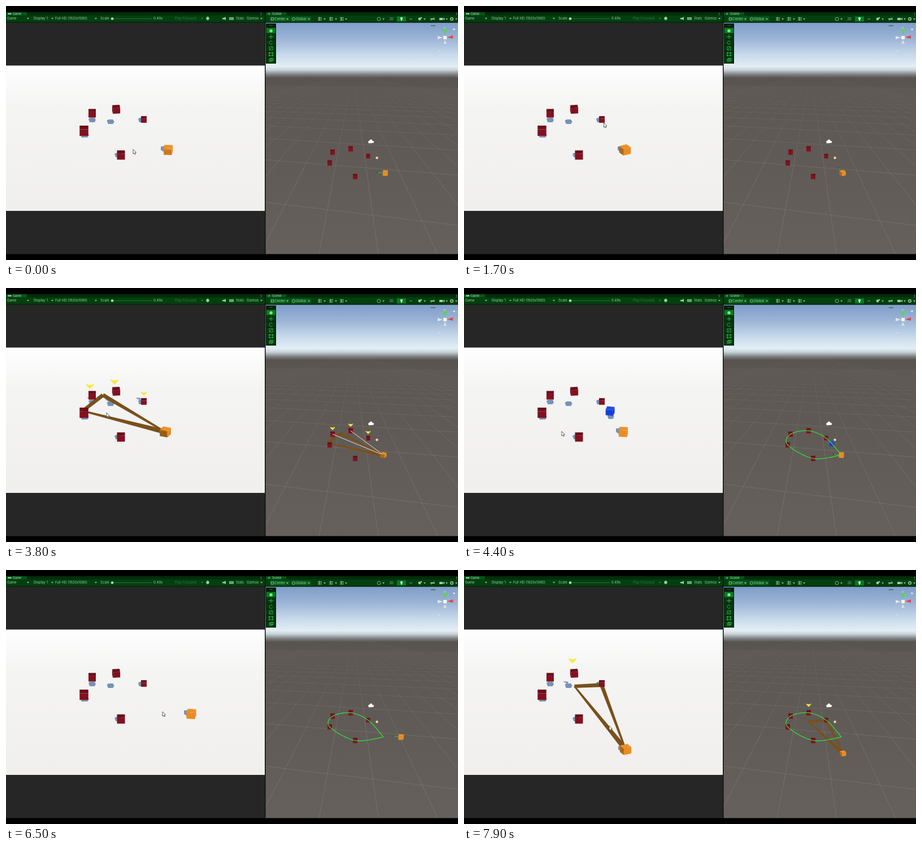
An HTML page with a canvas for the animation above (8000 ms loop, 800 px wide and 450 px high).

```html
<!DOCTYPE html>
<html lang="en">
<head>
<meta charset="utf-8">
<title>Boomerang targeting</title>
<style>
html, body { margin: 0; width: 100%; height: 100%; overflow: hidden; background: #000; }
canvas { display: block; width: 800px; height: 450px; }
</style>
</head>
<body>
<canvas id="stage" width="800" height="450"></canvas>
<script>
const ctx = document.getElementById('stage').getContext('2d');
const LOOP = 8000, STEP = 100, TAU = Math.PI * 2;

// Target order is the order in which the thrown cube visits them.
const targets = [
  { x: 244, y: 201, s: 10, sx: 641, sy: 266, shadow: [239, 202], tip: [0, -16] },
  { x: 195, y: 183, s: 13, sx: 610, sy: 253, shadow: [185, 205], tip: [-3, -19] },
  { x: 152.5, y: 190, s: 13, sx: 578, sy: 259, shadow: [152.5, 202], tip: [-4, -18] },
  { x: 138, y: 221, s: 15.5, sx: 573, sy: 278, shadow: [139, 229], tip: [-5, -17.5] },
  { x: 203.5, y: 264, s: 14, sx: 618, sy: 302, shadow: [199, 264], tip: [-2, -18] }
];

const cursorKeys = [[0, 225, 254], [350, 205, 238], [800, 243, 223], [1400, 255, 208],
  [2000, 240, 206], [2700, 265, 220], [2900, 265, 220], [3300, 225, 206], [3800, 178, 221],
  [4200, 172, 252], [5200, 181, 271], [5800, 181, 271], [6500, 277, 251],
  [7100, 264, 284], [7900, 257, 276]];
const playerKeys = [[0, 287, 255], [200, 285, 255], [1800, 285, 255], [2600, 321, 255],
  [2900, 321, 255], [3400, 282, 255], [5800, 282, 255], [6400, 328, 255],
  [6600, 328, 255], [7400, 286, 318], [7900, 286, 318]];
const flightKeys = [[4200, 0], [5200, 3.36], [5400, 4], [5600, 4.85], [5900, 6]];
const aimSpans = [[200, 1700, 128], [3200, 4200, 152], [7600, 8000, 154]];
// Target index, first and last time it carries an arrow.
const marks = [[3, 400, 1700], [1, 700, 1700], [0, 3350, 4200], [1, 3500, 4200],
  [2, 3650, 4200], [3, 3950, 4200], [1, 7700, 8000]];

function at(keys, t, ease = true) {
  let i = 0;
  while (i < keys.length - 2 && t >= keys[i + 1][0]) i++;
  const a = keys[i], b = keys[i + 1];
  let p = Math.max(0, Math.min(1, (t - a[0]) / (b[0] - a[0])));
  if (ease) p = p * p * (3 - 2 * p);
  return a.slice(1).map((v, k) => v + (b[k + 1] - v) * p);
}

const toScene = ([x, y]) => {
  const d = y - 255;
  return [668 + (x - 282) * 0.68, 296 + d * 0.524 - d * d * 0.00101];
};

function spline(pts, u) {
  const i = Math.max(0, Math.min(pts.length - 2, Math.floor(u))), p = u - i;
  const get = k => pts[Math.max(0, Math.min(pts.length - 1, k))];
  const [a, b, c, d] = [get(i - 1), get(i), get(i + 1), get(i + 2)];
  return [0, 1].map(k => 0.5 * (2 * b[k] + (c[k] - a[k]) * p +
    (2 * a[k] - 5 * b[k] + 4 * c[k] - d[k]) * p * p + (3 * b[k] - a[k] - 3 * c[k] + d[k]) * p ** 3));
}

function rect(x, y, w, h, fill) { ctx.fillStyle = fill; ctx.fillRect(x, y, w, h); }
function poly(pts, fill) {
  ctx.beginPath();
  pts.forEach(p => ctx.lineTo(p[0], p[1]));
  ctx.closePath();
  ctx.fillStyle = fill;
  ctx.fill();
}
function line(a, b, color, width = 1) {
  ctx.beginPath();
  ctx.moveTo(a[0], a[1]);
  ctx.lineTo(b[0], b[1]);
  ctx.strokeStyle = color;
  ctx.lineWidth = width;
  ctx.stroke();
}
function dot(x, y, r, fill) {
  ctx.beginPath();
  ctx.arc(x, y, r, 0, TAU);
  ctx.fillStyle = fill;
  ctx.fill();
}
function text(s, x, y, color = '#9bd0a0', size = 6) {
  ctx.font = size + 'px Inter, sans-serif';
  ctx.fillStyle = color;
  ctx.fillText(s, x, y);
}
function gradient(y0, y1, stops) {
  const g = ctx.createLinearGradient(0, y0, 0, y1);
  stops.forEach(([p, c]) => g.addColorStop(p, c));
  return g;
}
const mix = (a, b, p) => [a[0] + (b[0] - a[0]) * p, a[1] + (b[1] - a[1]) * p];

function cube([x, y], size, angle, [top, light, dark], stripes) {
  const h = size * 0.75, ring = [0, 1, 2, 3].map(i => {
    const a = angle + TAU / 8 + i * TAU / 4;
    return [x + Math.cos(a) * size * 0.707, y - h / 2 + Math.sin(a) * size * 0.3];
  });
  ring.forEach((p, i) => {
    const q = ring[(i + 1) % 4], n = angle + (i + 1) * TAU / 4;
    if (Math.sin(n) < 0.02) return;
    const down = v => [v[0], v[1] + h];
    poly([p, q, down(q), down(p)], Math.cos(n) < -0.3 ? dark : light);
    if (stripes && Math.cos(n) < 0.3) {
      for (let k = 1; k < 6; k++) {
        const m = mix(p, q, k / 6);
        line([m[0], m[1] + 2], down(m), 'rgba(70,45,15,.6)', 0.8);
      }
    }
  });
  poly(ring, top);
}
const RED = ['#6d0e1a', '#84101f', '#650b16'];
const ORANGE = ['#ec9129', '#ea8c23', '#a9681c'];
const BLUE = ['#1c4ee0', '#153fd6', '#1137b8'];

function shadow(x, y, w) {
  poly([[x - w / 2, y - 2], [x - w / 4, y - 4], [x + w / 3, y - 4], [x + w / 2, y],
    [x + w / 3, y + 4], [x - w / 3, y + 4]], '#7891b7');
}

function arrow(x, y, k) {
  poly([[-8, -4], [-4, -3], [-2, -2], [0, -3], [2, -2], [4, -3], [8, -4], [4, 1], [0, 5], [-4, 1]]
    .map(p => [x + p[0] * k, y + p[1] * k]), '#f7e943');
}

function taper(a, b, wa, wb) {
  const d = Math.hypot(b[0] - a[0], b[1] - a[1]) || 1;
  const nx = (a[1] - b[1]) / d / 2, ny = (b[0] - a[0]) / d / 2;
  poly([[a[0] + nx * wa, a[1] + ny * wa], [b[0] + nx * wb, b[1] + ny * wb],
    [b[0] - nx * wb, b[1] - ny * wb], [a[0] - nx * wa, a[1] - ny * wa]], '#79501a');
}
function cone([apex, a, b], k) {
  taper(a, apex, 3 * k, 9 * k);
  taper(b, apex, 7 * k, 3 * k);
  taper(a, b, 6 * k, 7 * k);
}

function state(t) {
  const player = at(playerKeys, t), cursor = at(cursorKeys, t);
  const SQUASH = 0.9;
  const aim = Math.atan2((cursor[1] - player[1]) / SQUASH, cursor[0] - player[0]) + 0.08;
  const span = aimSpans.find(s => t >= s[0] && t < s[1]);
  const reach = (a, r) => [player[0] + Math.cos(a) * r, player[1] + Math.sin(a) * r * SQUASH];
  const wedge = span && [player, reach(aim - 0.153, span[2]), reach(aim + 0.153, span[2] * 0.87)];
  return { t, player, cursor, aim, wedge, reach,
    bob: 5 * Math.cos(TAU * (t / 1600 - 0.56)),
    flight: t >= 4200 && t < 5900 ? at(flightKeys, t, false)[0] : null,
    marked: marks.filter(m => t >= m[1] && t < m[2]).map(m => targets[m[0]]) };
}

const gamePath = [[282, 255], ...targets.map(o => [o.x, o.y]), [282, 255]];
const scenePath = [[668, 296], ...targets.map(o => [o.sx, o.sy]), [668, 296]];

function drawGame(s) {
  rect(0, 29, 458, 411, '#262626');
  rect(0, 105.5, 458, 257.5, gradient(105, 363, [[0, '#fdfefd'], [0.3, '#f4f4f3'], [1, '#f0efee']]));
  targets.forEach(o => shadow(...o.shadow, o.s));
  s.marked.forEach(o => {
    const x = o.shadow[0] - 5, y = o.shadow[1] - 5;
    poly([[x - 5, y - 3], [x + 5, y - 2], [x + 3, y + 2]], '#7891b7');
  });
  const [px, py] = s.player;
  poly([[px - 13, py - 6], [px - 5, py - 7], [px + 2, py + 7], [px - 6, py + 5], [px - 13, py]], '#7891b7');
  const blue = s.flight !== null && spline(gamePath, s.flight);
  if (blue) {
    shadow(blue[0] + 1, blue[1] + 10, 12);
    cube(blue, 13.5, 0.2, BLUE);
  }
  if (s.wedge) cone(s.wedge, 1);
  targets.forEach((o, i) => cube([o.x, o.y], o.s, i === 1 ? -0.1 : 0, RED));
  cube(s.player, 15, s.aim, ORANGE, s.t < 200 || s.t >= 1800 && s.t < 4200);
  s.marked.forEach(o => arrow(o.x + o.tip[0], o.y + o.tip[1] + s.bob, o.s > 10 ? 1 : 0.8));
  drawCursor(...s.cursor);
}

function drawCursor(x, y) {
  const shape = [[0, 0], [0, 8], [1.8, 6.5], [3, 9], [4.3, 8.4], [3.2, 5.8], [5.5, 5.6]];
  poly(shape.map(p => [x + p[0], y + p[1]]), '#fff');
  ctx.strokeStyle = '#222';
  ctx.lineWidth = 0.7;
  ctx.stroke();
}

function drawGround() {
  rect(459, 29, 341, 411, gradient(29, 440, [[0, '#7f9dc8'], [0.07, '#9bb4d6'], [0.14, '#c8d9eb'],
    [0.19, '#e3eff5'], [0.205, '#c9d3d8'], [0.225, '#7d8082'], [0.24, '#57534f'],
    [0.3, '#5d5753'], [1, '#65605b']]));
  const faded = gradient(125, 300, [[0, 'rgba(150,145,140,.05)'], [1, 'rgba(155,150,145,.42)']]);
  for (let i = -12; i <= 12; i++) {
    line([614 + (i * 105 + 45) * 0.025, 126], [659 + i * 105, 440], faded, 0.7);
  }
  for (let n = 0; n < 22; n++) {
    const d = 970 / (4 + 2 * n);
    line([459, 122 + d * 0.93], [800, 122 + d * 1.1], faded, 0.7);
  }
}

function drawScene(s) {
  ctx.save();
  ctx.beginPath();
  ctx.rect(459, 29, 341, 411);
  ctx.clip();
  drawGround();
  const player = toScene(s.player);
  if (s.wedge) cone(s.wedge.map(toScene), 0.65);
  const blue = s.flight !== null && spline(scenePath, s.flight);
  if (blue) cube(blue, 8, 0.1, BLUE);
  targets.forEach(o => cube([o.sx, o.sy], o.s > 10 ? 8 : 7, 0, RED));
  if (!s.wedge) {
    const end = toScene(s.reach(s.aim, 21));
    line(player, end, '#35c83f', 1);
    dot(end[0], end[1], 1, '#164d1b');
  }
  if (s.t >= 4200) {
    ctx.beginPath();
    for (let u = 0; u <= 6.001; u += 0.05) ctx.lineTo(...spline(scenePath, u));
    ctx.strokeStyle = '#2fe53c';
    ctx.lineWidth = 1.2;
    ctx.stroke();
  }
  if (s.t > 3400 && s.t < 4200) {
    s.marked.filter(o => o === targets[1] || o === targets[2])
      .forEach(o => line([o.sx, o.sy], player, '#f2f2ef', 0.9));
  }
  cube(player, 8.5, s.aim, ORANGE);
  s.marked.forEach(o => arrow(o.sx, o.sy - 11.5 + s.bob * 0.6, 0.62));
  // Camera and light markers
  dot(643.5, 241, 2.4, '#fff');
  dot(646, 239, 2.6, '#fff');
  rect(642, 239, 7, 4, '#fff');
  poly([[648, 241], [651, 238.5], [651, 243]], '#fff');
  dot(656.5, 269, 2.5, 'rgba(245,190,130,.65)');
  dot(656.5, 269, 1.4, '#fff0d8');
  drawAxes();
  drawTools();
  ctx.restore();
}

function drawAxes() {
  poly([[773, 41], [781, 41], [777, 51]], '#59d64c');
  poly([[764, 53], [764, 59], [773, 56]], '#e4e6e8');
  poly([[791, 52], [791, 58], [781, 55.5]], '#db4a42');
  poly([[774, 67], [780, 67], [777, 60]], '#dedfe0');
  rect(774, 53, 6, 6, '#f4f4f2');
  text('y', 775, 39.5, '#e8f4e8', 5);
  text('x', 792, 55, '#d88', 5);
  rect(791.5, 40, 3, 2.6, '#e8edf2');
  rect(765, 79, 4, 1, 'rgba(235,240,245,.7)');
  for (let i = 0; i < 4; i++) rect(752 + i * 2, 34, 1.4, 1.6, '#31592f');
}

function drawTools() {
  const green = '#25b63d';
  rect(460, 31, 18, 71, '#061f0b');
  rect(466, 34, 6, 0.8, '#3c6b42');
  for (let i = 0; i < 6; i++) rect(461, 38.8 + i * 10.5, 16, 9.5, i ? '#06370f' : '#087c20');
  dot(469, 44, 2.8, '#7be58a');
  line([465, 54.5], [473, 54.5], green);
  line([469, 50.8], [469, 58.2], green);
  ctx.strokeStyle = green;
  ctx.lineWidth = 0.9;
  ctx.beginPath();
  ctx.arc(469, 65, 3, 0.4, 5.7);
  ctx.stroke();
  ctx.strokeRect(466, 72, 6, 6);
  line([467, 77], [471, 73], green);
  ctx.strokeRect(466, 83, 6, 5);
  for (const x of [465, 471]) for (const y of [82, 87]) rect(x, y, 2, 2, green);
  ctx.strokeRect(466, 94, 5, 4);
  ctx.strokeRect(468, 92.5, 5, 4);
}

function caret(x, y = 22) { poly([[x - 2, y - 1], [x + 2, y - 1], [x, y + 1.7]], '#8abd90'); }

function drawBars() {
  rect(0, 0, 800, 11, '#000');
  rect(0, 11, 800, 18.5, '#043f10');
  rect(0, 11, 800, 5.5, '#032d0b');
  rect(0, 11, 37, 5.5, '#05551a');
  rect(460, 11, 36, 5.5, '#05551a');
  rect(0, 28.5, 800, 1, '#021b07');
  dot(5, 13.8, 1.5, '#a9d5ad');
  dot(8, 13.8, 1.5, '#a9d5ad');
  text('Game', 12, 15.6, '#a9d5ad', 5.5);
  text('Scene', 471, 15.6, '#a9d5ad', 5.5);
  text('#', 464, 15.6, '#a9d5ad', 5);
  for (const x of [451, 797]) for (let i = 0; i < 3; i++) rect(x, 12 + i * 1.5, 1, 0.9, '#8abd90');

  [['Game', 2], ['Display 1', 49], ['Full HD (1920x1080)', 87], ['Scale', 167], ['0.49x', 261],
    ['Stats', 407], ['Gizmos', 426]].forEach(([s, x]) => text(s, x, 24.4));
  text('Play Focused', 299, 24.4, '#3b7545');
  [39, 82, 159, 452].forEach(x => caret(x));
  line([185, 22.5], [258, 22.5], '#397545', 0.8);
  dot(188, 22.5, 2.3, '#b9dcbc');
  poly([[345, 21], [349, 21], [347, 23.7]], '#3b7545');
  dot(357, 22, 2.7, '#9bd0a0');
  line([357, 18.5], [357, 25.5], '#9bd0a0', 0.8);
  poly([[383, 21], [386, 21], [389, 19], [389, 25], [386, 23.5], [383, 23.5]], '#9bd0a0');
  rect(395, 20, 8, 4.5, '#8abd90');
  line([396, 22], [402, 22], '#043f10', 0.7);

  rect(467, 18.5, 35, 9, '#075a1b');
  rect(504, 18.5, 36, 9, '#075a1b');
  text('Center', 475, 25);
  text('Global', 513, 25);
  [498, 536, 564, 584, 602, 668, 741, 780].forEach(x => caret(x, 23));
  ctx.strokeStyle = '#9bd0a0';
  ctx.lineWidth = 0.8;
  ctx.strokeRect(469.5, 21, 4, 4);
  ctx.beginPath();
  ctx.arc(509, 23, 2.5, 0, TAU);
  ctx.moveTo(663, 23);
  ctx.arc(660, 23, 3, 0, TAU);
  ctx.stroke();
  for (const x of [552, 572, 591]) {
    for (let i = 0; i < 3; i++) line([x, 20.5 + i * 2.3], [x + 7, 20.5 + i * 2.3], '#9bd0a0', 0.8);
    line([x + 2.5, 19.5], [x + 2.5, 26], '#9bd0a0', 0.8);
  }
  rect(692, 18.5, 16, 9, '#087c20');
  text('2D', 678.5, 25, '#8abd90', 5.5);
  dot(700, 22, 2.2, '#d5efd7');
  rect(699, 24, 2, 2, '#d5efd7');
  rect(714, 22, 5, 2, '#397545');
  dot(732, 23, 2.4, '#9bd0a0');
  dot(735, 21, 1.3, '#9bd0a0');
  line([751, 23], [759, 23], '#9bd0a0', 1.8);
  line([752, 26], [758, 20], '#9bd0a0', 0.8);
  rect(767, 21, 6, 4, '#9bd0a0');
  poly([[773, 23], [776, 20.5], [776, 25.5]], '#9bd0a0');
  dot(789, 23, 3, '#9bd0a0');
  dot(789, 23, 1.5, '#043f10');
  caret(797, 23);
}

function draw(t) {
  const s = state(t);
  rect(0, 0, 800, 450, '#000');
  drawGame(s);
  drawScene(s);
  drawBars();
  rect(458, 11, 1.5, 429, '#06170a');
  rect(0, 439.5, 800, 10.5, '#000');
}

const start = performance.now();
function tick() {
  const t = (performance.now() - start) % LOOP;
  draw(Math.floor(t / STEP) * STEP);
  requestAnimationFrame(tick);
}
tick();
</script>
</body>
</html>
```
